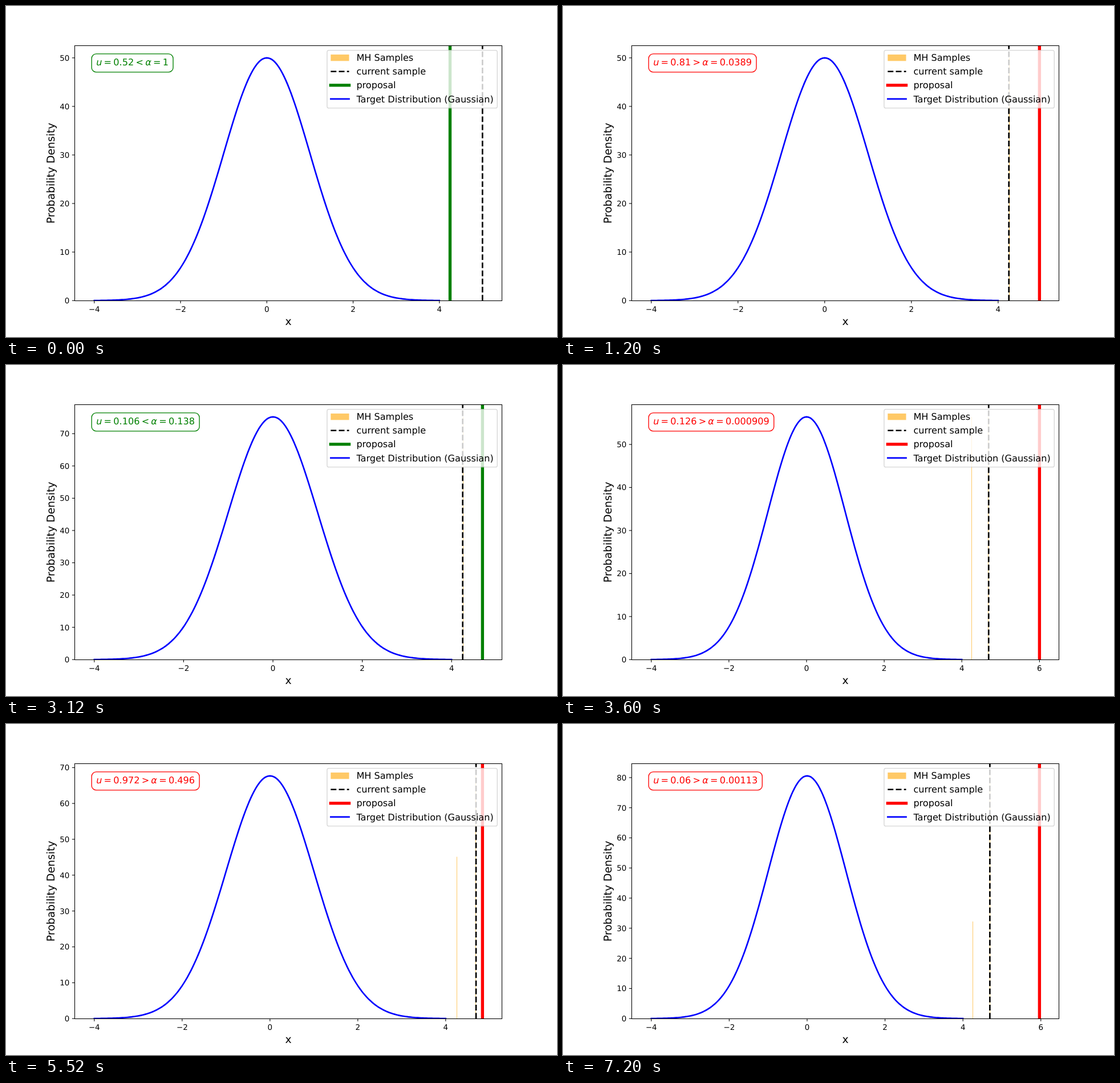
Recreate the animation shown at these times as an HTML page. Size 966x580 px, loop 8 s.

```html
<!DOCTYPE html>
<html lang="en">
<head>
<meta charset="utf-8">
<title>Metropolis-Hastings sampling</title>
<style>
  html, body { margin: 0; width: 100%; height: 100%; overflow: hidden; background: #fff; }
  svg { display: block; width: 966px; height: 580px; }
  text { font-family: "DejaVu Sans", sans-serif; text-rendering: geometricPrecision; }
  .tick { font-size: 13.42px; }
  .label { font-size: 18.78px; text-anchor: middle; }
  .legend, .note { font-size: 16.1px; }
  .italic { font-style: italic; }
  .axis { stroke: #000; stroke-width: 1.07; fill: none; }
  .curve { stroke: #00f; stroke-width: 2.68; fill: none; stroke-linejoin: round; stroke-linecap: square; }
  .current { stroke: #000; stroke-width: 2.68; stroke-dasharray: 9.93 4.29; }
  .proposal { stroke-width: 5.37; stroke-linecap: square; }
  .bar { fill: #ffa500; fill-opacity: .6; }
</style>
</head>
<body>
<svg id="stage" viewBox="0 0 966 580">
  <clipPath id="plot"><rect x="120.75" y="69.6" width="748.65" height="446.6"/></clipPath>
  <text class="label" x="495.1" y="558.7">x</text>
  <text class="label" transform="translate(84.5 292.9) rotate(-90)">Probability Density</text>
</svg>
<script>
const LEFT = 120.75, RIGHT = 869.4, TOP = 69.6, BOTTOM = 516.2;
const X_START = 154.78, X_SPAN = 680.59, HEIGHT = BOTTOM - TOP;
const STEP = 1200, LOOP = 8000, EM = 16.1;
const A = 4.248, B = 4.6912, C = 5;   // accepted positions
const BIN = (B - A) / 50;

// u, alpha, current sample, proposal, samples counted at A and at B
const steps = [
  ["0.52", "1", C, A, 1, 0],
  ["0.81", "0.0389", A, 4.954, 2, 0],
  ["0.106", "0.138", A, B, 2, 1],
  ["0.126", "0.000909", B, 6.001, 2, 2],
  ["0.972", "0.496", B, 4.838, 2, 3],
  ["0.0715", "0.04", B, 5.333, 2, 4],
  ["0.06", "0.00113", B, 5.965, 2, 5]
];

const svg = document.getElementById("stage");

function add(parent, tag, attrs, text) {
  const el = document.createElementNS("http://www.w3.org/2000/svg", tag);
  for (const k in attrs) el.setAttribute(k, attrs[k]);
  if (text !== undefined) el.textContent = text;
  return parent.appendChild(el);
}

function line(parent, cls, x1, y1, x2, y2, stroke) {
  const attrs = { class: cls, x1, y1, x2, y2 };
  if (stroke) attrs.stroke = stroke;
  return add(parent, "line", attrs);
}

function drawLegend(g, color) {
  const x0 = 569.3, x1 = 601.5, y = i => 90.7 + 24.07 * i;
  add(g, "rect", {
    x: 562.9, y: 77.65, width: 298.4, height: 101.2, rx: 3.2,
    fill: "#fff", stroke: "#ccc", "stroke-width": 1.34, opacity: .8
  });
  add(g, "rect", { class: "bar", x: x0, y: 85.05, width: x1 - x0, height: 11.27 });
  line(g, "current", x0, y(1), x1, y(1));
  line(g, "proposal", x0, y(2), x1, y(2), color);
  line(g, "curve", x0, y(3), x1, y(3));
  ["MH Samples", "current sample", "proposal", "Target Distribution (Gaussian)"].forEach((s, i) =>
    add(g, "text", { class: "legend", x: 614.4, y: y(i) + 5.6 }, s));
}

function drawNote(g, u, alpha, sign, color) {
  const x = 158.2, pad = EM / 2;
  const box = add(g, "rect", {
    x: x - pad, y: 83.85, height: 32.1, rx: pad,
    fill: "#fff", stroke: color, "stroke-width": 1.34
  });
  const text = add(g, "text", { class: "note", x, y: 104.2, fill: color });
  ["u", "=", u, sign, "α", "=", alpha].forEach((s, i) =>
    add(text, "tspan", { dx: i ? EM / 5 : 0, class: /[uα]/.test(s) ? "italic" : "" }, s));
  box.setAttribute("width", text.getBBox().width + 2 * pad);
}

function drawStep([u, alpha, current, proposal, nA, nB]) {
  const accepted = +u < +alpha;
  const color = accepted ? "#008000" : "#f00";
  const scale = X_SPAN / (Math.max(current, proposal) + 4);
  const bin = nB ? BIN : .02;
  const density = n => n / ((nA + nB) * bin);
  const peak = density(Math.max(nA, nB));
  const px = v => X_START + (v + 4) * scale;
  const py = v => BOTTOM - v / (1.05 * peak) * HEIGHT;

  const g = add(svg, "g", {});
  const plot = add(g, "g", { "clip-path": "url(#plot)" });

  const bar = (v, n) => {
    const w = bin * scale, x = px(v);
    add(plot, "rect", {
      class: "bar", x: w < 1 ? Math.floor(x + w / 2) : x, y: py(density(n)),
      width: Math.max(1, w), height: BOTTOM - py(density(n))
    });
  };
  bar(A, nA);
  if (nB) bar(B - bin, nB);

  line(plot, "current", px(current), BOTTOM, px(current), TOP);
  line(plot, "proposal", px(proposal), BOTTOM, px(proposal), TOP, color);

  const points = [];
  for (let i = 0; i <= 200; i++) {
    const v = -4 + i / 25;
    points.push(px(v).toFixed(2) + "," + py(peak * Math.exp(-v * v / 2)).toFixed(2));
  }
  add(plot, "polyline", { class: "curve", points: points.join(" ") });

  for (let v = -4; px(v) < RIGHT; v += 2) {
    line(g, "axis", px(v), BOTTOM, px(v), BOTTOM + 4.9);
    add(g, "text", { class: "tick", x: px(v), y: 535.8, "text-anchor": "middle" },
      String(v).replace("-", "\u2212"));
  }
  for (let v = 0; py(v) > TOP; v += 10) {
    line(g, "axis", LEFT - 4.9, py(v), LEFT, py(v));
    add(g, "text", { class: "tick", x: 111.3, y: py(v) + 4.9, "text-anchor": "end" }, v);
  }
  add(g, "rect", { class: "axis", x: 120.5, y: 69.5, width: 749, height: 447 });

  drawNote(g, u, alpha, accepted ? "<" : ">", color);
  drawLegend(g, color);
  return g;
}

const groups = steps.map(drawStep);
let shown = -1;

function render() {
  const index = Math.floor(performance.now() % LOOP / STEP);
  if (index !== shown) {
    groups.forEach((g, i) => g.style.display = i === index ? "" : "none");
    shown = index;
  }
  requestAnimationFrame(render);
}
render();
</script>
</body>
</html>
```
